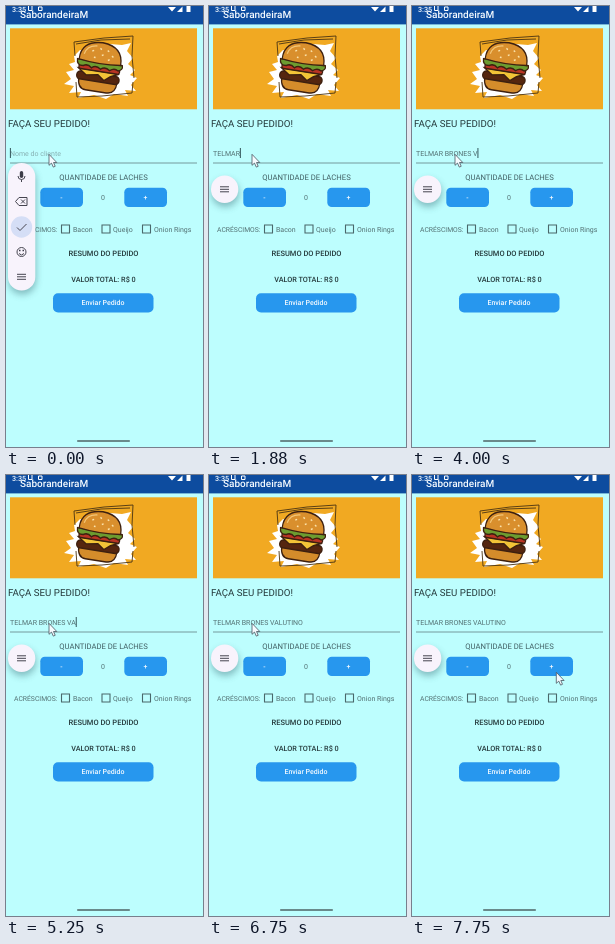
Recreate the animation shown at these times as an HTML page. Size 197 px wide and 441 px high, loop 8000 ms.

```html
<!DOCTYPE html>
<html lang="pt-BR">
<head>
<meta charset="utf-8">
<style>
html, body { margin: 0; width: 100%; height: 100%; overflow: hidden; background: #bdfefe; }
svg { display: block; width: 100vw; height: 100vh; }
text { font-family: Roboto, "Liberation Sans", sans-serif; font-size: 7px; fill: #527072;
  white-space: pre; text-rendering: geometricPrecision; }
.mid { text-anchor: middle; }
.dark { fill: #24393b; }
.med { font-weight: 500; }
.white { fill: #f4faff; font-weight: 500; }
.btn { fill: #2797ee; }
.box { fill: none; stroke: #4a686b; stroke-width: 1.1; }
.ico { fill: none; stroke: #45444f; stroke-width: 1; }
</style>
</head>
<body>
<svg viewBox="0 0 197 441" preserveAspectRatio="none">
  <defs>
    <filter id="soft" x="-100%" y="-50%" width="300%" height="200%"><feGaussianBlur stdDeviation="3.6"/></filter>
  </defs>
  <rect width="197" height="441" fill="#bdfefe"/>

  <!-- header -->
  <rect width="197" height="18.400" fill="#0d4c9f"/>
  <text class="white" x="14" y="12" style="font-size:10px">SaborandeiraM</text>
  <text class="white" x="6" y="5.600" style="font-size:7.2px">3:35</text>
  <path d="M22.500 0v4.500h3.500V0M32.500 1h3.500v3.500h-3.500z" fill="none" stroke="#fff"/>
  <path d="M162 1h8l-4 4.500zM171 6l5.500-5.500V6zM180.500 0h4v6h-4z" fill="#fff"/>

  <!-- banner -->
  <rect x="4" y="22.300" width="187" height="81" fill="#f1a922"/>
  <path fill="#fff" d="M68 50L74 44L86 46L104 38L116 39L125 37L121 45L127 52L122 58L129 64L124 69L131 72L125 79L130 85L119 84L122 90L108 88L100 93L88 89L72 92L75 86L63 87L68 80L58 78L65 73L60 66L68 64L63 58L69 56Z"/>
  <path fill="none" stroke="#4a3413" stroke-width=".9" d="M69 50L68 36L98 32L127 30L126 50L128 72M70 38L95 34L124 33M70 76L71 91L96 90L126 87L127 76"/>
  <g transform="translate(93 62) rotate(9) scale(.84 .98) translate(-96 -60)" stroke="#3d200f" stroke-width="1.500">
    <path fill="#d48c2b" d="M74 72H120Q120 84 109 84H84Q74 84 74 72Z"/>
    <rect x="71" y="66" width="51" height="8" rx="4" fill="#55260f"/>
    <path fill="#f2c437" d="M72 63H121L111 67L104 72L96 67L82 69Z"/>
    <rect x="72" y="58.500" width="49" height="5" rx="2.500" fill="#b93424"/>
    <path fill="#6c9c30" d="M69 54H123Q125 58 119 60Q114 57 109 61Q103 57 98 61Q92 57 87 61Q82 57 77 60Q69 61 69 54Z"/>
    <path fill="#d98f2d" d="M71 54Q70 35 96 34Q121 35 121 54Q96 57 71 54Z"/>
    <path fill="none" stroke="#f3c677" d="M76 48Q78 39 90 38"/>
    <path fill="none" stroke="#fbe3ab" d="M85 44l2-1M94 40l2 1M103 41l2 1M97 47l2-1M109 46l2 1M88 50l2 0M105 51l2-1"/>
  </g>

  <!-- form -->
  <text class="dark" x="2" y="120.800" style="font-size:9.7px">FAÇA SEU PEDIDO!</text>
  <text id="hint" x="4" y="149.500" style="fill:#86b0b2">Nome do cliente</text>
  <text id="name" x="4" y="149.500"></text>
  <path id="caret" d="M0 142V152" stroke="#26464a" stroke-width=".9"/>
  <path d="M4 157H191" stroke="#6c8e90" stroke-width=".9"/>
  <text class="mid" x="97.500" y="173.800" style="font-size:7.7px;fill:#3f5d61">QUANTIDADE DE LACHES</text>
  <rect class="btn" x="34.300" y="181.700" width="42.700" height="19.300" rx="4.500"/>
  <rect class="btn" x="118.300" y="181.700" width="42.700" height="19.300" rx="4.500"/>
  <text class="mid white" x="55.500" y="193.800">-</text>
  <text class="mid" x="97" y="194">0</text>
  <text class="mid white" x="139.500" y="193.800">+</text>
  <text x="8" y="226" style="font-size:6.8px">ACRÉSCIMOS:</text>
  <path class="box" d="M55.500 219h8v8h-8zM96 219h8v8h-8zM136.500 219h8v8h-8z"/>
  <text x="67" y="226">Bacon</text>
  <text x="107" y="226">Queijo</text>
  <text x="148" y="226">Onion Rings</text>
  <text class="mid dark med" x="97.500" y="250" style="font-size:7.5px">RESUMO DO PEDIDO</text>
  <text class="mid dark med" x="97.500" y="275.500" style="font-size:7.3px">VALOR TOTAL: R$ 0</text>
  <rect class="btn" x="47" y="287.300" width="100.500" height="19.200" rx="5"/>
  <text class="mid white" x="97" y="299.200">Enviar Pedido</text>
  <rect x="71" y="434.300" width="53" height="1.500" rx=".7" fill="#4d6466"/>

  <!-- floating toolbar -->
  <rect id="shade" x="2.500" width="27.500" rx="13.700" fill="#2f6069" opacity=".42" filter="url(#soft)"/>
  <rect id="pill" x="2" width="27.300" rx="13.600" fill="#f8f3fc"/>
  <g id="tools">
    <circle cx="15.500" cy="221" r="10.700" fill="#d5def6"/>
    <rect x="13.800" y="165" width="3.400" height="7" rx="1.700" fill="#3d3c48"/>
    <path class="ico" d="M12 170Q12 173.500 15.500 173.500T19 170M15.500 173.500V176M9.500 195.500L13 191.500H21V199.500H13ZM15 193.500l4 4m0-4l-4 4M11 221.500l3 3 6.500-6.500M13 247.500q2.500 3 5 0"/>
    <circle class="ico" cx="15.500" cy="246" r="4.500"/>
    <path d="M13 244.500h1.500M16.500 244.500h1.500" stroke="#3d3c48" stroke-width="1.300"/>
  </g>
  <path id="menu" class="ico" d="M11 -2.500h9M11 0h9M11 2.500h9"/>

  <path id="mouse" d="M0 0V11L2.500 8.800L4.300 12.800L6.200 12L4.500 8.200H7.800Z" fill="#f6fbff" stroke="#4a5660" stroke-width=".8"/>
</svg>
<script>
const LOOP = 8000;
const $ = id => document.getElementById(id);
// "<" deletes the last letter
const keys = "TELMAR BRONES VAU<LUTINO";
const times = [880, 1130, 1380, 1500, 1630, 1880, 2250, 2500, 2750, 3000, 3130, 3250,
  3500, 3630, 4000, 4130, 4750, 5250, 5380, 5500, 5750, 6000, 6130, 6250];

const ease = x => x * x * (3 - 2 * x);
const ramp = (t, from, to) => ease(Math.min(1, Math.max(0, (t - from) / (to - from))));
const mix = (a, b, k) => a + (b - a) * k;
const set = (id, attrs) => { for (const k in attrs) $(id).setAttribute(k, attrs[k]); };

function drawName(t) {
  let typed = "", last = -370;
  times.forEach((time, i) => {
    if (t < time) return;
    typed = keys[i] === "<" ? typed.slice(0, -1) : typed + keys[i];
    last = time;
  });
  const name = $("name");
  if (name.textContent !== typed) name.textContent = typed;
  const x = 4.4 + (typed ? name.getComputedTextLength() : 0);
  const on = Math.floor((t - last) / 500) % 2 === 0;
  set("hint", { opacity: typed ? 0 : 1 });
  set("caret", { transform: `translate(${x} 0)`, opacity: on ? 1 : 0 });
}

function drawToolbar(t) {
  const fold = ramp(t, 560, 880), rise = 8 * ramp(t, 880, 1380);
  const top = mix(157, 177.5, fold) - rise;
  const bottom = mix(284.5, 205, fold) - rise;
  set("pill", { y: top, height: bottom - top });
  set("shade", { y: top + 4, height: bottom - top });
  set("tools", { opacity: Math.max(0, 1 - fold * 2) });
  set("menu", { transform: `translate(0 ${bottom - 13.7})` });
}

function draw(now) {
  const t = now % LOOP;
  drawName(t + 10);
  drawToolbar(t);
  const k = ramp(t, 6800, 7700);
  set("mouse", { transform: `translate(${mix(43, 144.3, k)} ${mix(148.3, 197.3, k)})` });
  requestAnimationFrame(draw);
}
draw(0);
</script>
</body>
</html>
```
